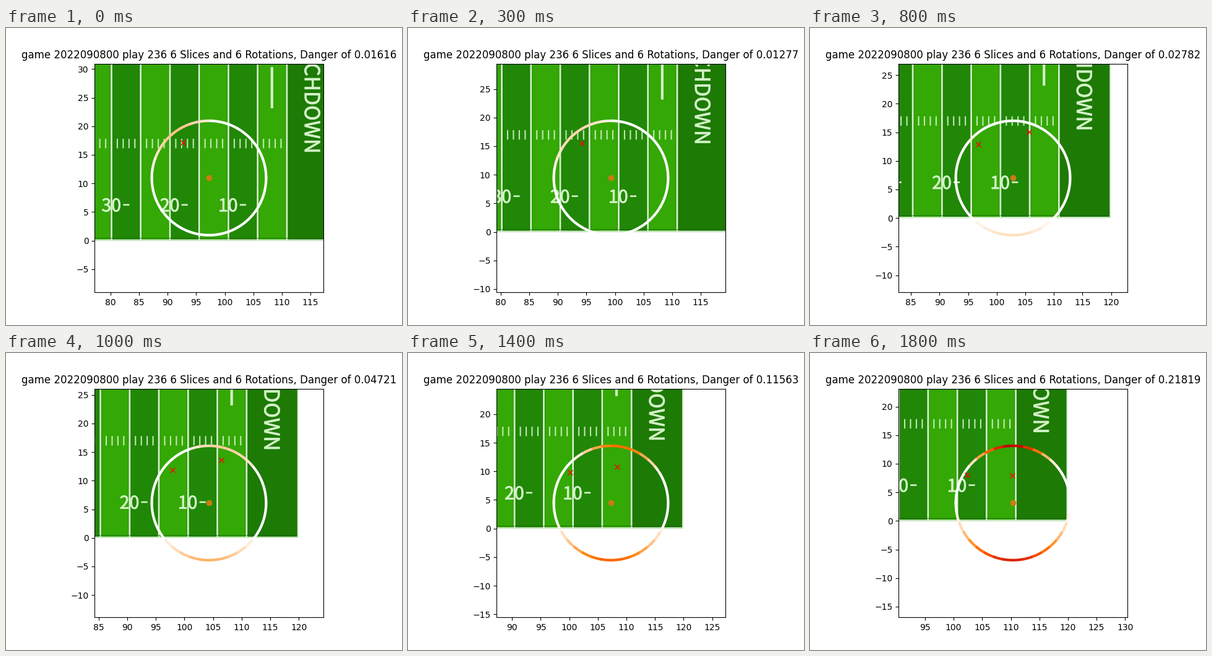
Animation of 640 by 480 pixels, one loop 1.9 s. Source, as a matplotlib script:

```python
import numpy as np
import matplotlib.pyplot as plt
from matplotlib.animation import FuncAnimation
from matplotlib.collections import LineCollection
from matplotlib.patches import Rectangle
from matplotlib.patheffects import withStroke
from matplotlib.ticker import MultipleLocator

FRAMES, INTERVAL = 19, 100
REACH, VIEW = 10, 20          # yards: circle radius, half the window
LIGHT, DARK, END_ZONE = "#34a805", "#218707", "#1d7a05"
PAINT, EDGE = "#d2f2c6", "#d8f0d2"
STRIPE, GOAL, FIELD_END = 5.113, 110.87, 119.85

# Displayed danger at a few steps, growing exponentially in between
DANGER = {0: 0.01616, 3: 0.01277, 5: 0.01375, 6: 0.0166,
          8: 0.02782, 10: 0.04721, 14: 0.11563, 18: 0.21819}

fig, ax = plt.subplots(figsize=(6.4, 4.8), dpi=100)
ax.set_aspect("equal", adjustable="box")
ax.set_autoscale_on(False)
for axis in (ax.xaxis, ax.yaxis):
    axis.set_major_locator(MultipleLocator(5))


def stroke(xs, ys, width, color=PAINT, alpha=1):
    ax.plot(xs, ys, color=color, lw=width, alpha=alpha, zorder=1.5,
            solid_capstyle="butt", snap=False, scalex=False, scaley=False)


def block(x, width, color):
    ax.add_patch(Rectangle((x, 0), width, 53, fc=color, lw=0, snap=False))


def paint_text(x, y, text, size, rotation=0):
    ax.text(x, y, text, size=size, rotation=rotation, rotation_mode="anchor",
            ha="right", va="baseline", color=PAINT, zorder=2, clip_on=True,
            family="Noto Sans CJK JP",
            path_effects=[withStroke(linewidth=0.6, foreground=PAINT)])


def draw_field():
    block(GOAL, FIELD_END - GOAL, END_ZONE)
    for i in range(1, 9):
        x = GOAL - i * STRIPE
        block(x, STRIPE, LIGHT if i % 2 else DARK)
        for k in range(1, 5):
            mark = x + k * STRIPE / 5
            stroke([mark, mark], [16.15, 17.8], 1.5, alpha=0.9)
    for i in range(9):
        x = GOAL - i * STRIPE
        stroke([x, x], [0, 53], 3.6, "#1c7206", 0.45)
        stroke([x, x], [0, 53], 2)

    stroke([60, FIELD_END], [0.42, 0.42], 1, "#135a04", 0.5)
    stroke([60, FIELD_END], [0.1, 0.1], 1.4, EDGE)
    stroke([FIELD_END] * 2, [0, 53], 1.4, EDGE)
    stroke([108.26] * 2, [23.15, 30.35], 3)

    for i in range(3):
        x = 102.28 - 10.2 * i
        paint_text(x, 5.1, f"{10 * (i + 1)}", 20.5)
        stroke([x + 0.35, x + 1.45], [6.25, 6.25], 1.9)
    paint_text(114.0, 15.25, "TOUCHDOWN", 24, rotation=270)


def poly(t, *coeffs):
    return sum(c * t ** n for n, c in enumerate(coeffs))


def ball_at(t):
    return np.array([poly(t, 97.24, 0.674, 0.0031),
                     poly(t, 10.95, -0.508, 0, 0.000227)])


def men_at(t):
    """Defenders relative to the ball."""
    left = poly(t, -4.55, -0.175, -0.001), poly(t, 6.2, -0.035, 0, -0.000115)
    right = poly(t, 5.1, -0.29), poly(t, 9.5, -0.115, -0.0082)
    return np.array([left, right])


def lobe(angles, center, height, half):
    off = np.abs((angles - center + 180) % 360 - 180) / half
    return np.where(off < 1, max(height, 0) * np.cos(off * np.pi / 2) ** 2, 0)


def heat_around(angles, ball, men):
    """Close defenders and a close sideline heat up their side of the ring."""
    heat = lobe(angles, 270, 0.095 * (7.7 - ball[1]), 111 - 7 * ball[1])
    for x, y in men:
        bearing = np.degrees(np.arctan2(y, x))
        heat = heat + lobe(angles, bearing, 0.13 * (8.6 - np.hypot(x, y)), 57)
    return np.where(heat < 0.025, 0, heat)


draw_field()
STARTS = np.arange(0, 360, 10)
ARCS = np.radians(STARTS[:, None] + np.linspace(-0.4, 10.4, 7))
RING = REACH * np.stack([np.cos(ARCS), np.sin(ARCS)], axis=-1)
HEAT = plt.get_cmap("gist_heat_r")

ring = LineCollection(RING, linewidths=3, zorder=3)
ax.add_collection(ring, autolim=False)
dot, = ax.plot([], [], "o", color="#c87d12", ms=6, zorder=4)
crosses, = ax.plot([], [], "x", color="red", ms=6, zorder=4)


def draw(step):
    ball, men = ball_at(step), men_at(step)
    ax.set_xlim(ball[0] - VIEW, ball[0] + VIEW)
    ax.set_ylim(ball[1] - VIEW, ball[1] + VIEW)
    dot.set_data(ball[:, None])

    near = men[np.hypot(*men.T) < REACH]
    crosses.set_data((near + ball).T)
    ring.set_segments(RING + ball)
    ring.set_color(HEAT(heat_around(STARTS + 5, ball, men)))

    logs = np.log(list(DANGER.values()))
    danger = float(np.exp(np.interp(step, list(DANGER), logs)))
    ax.set_title("game 2022090800 play 236 6 Slices and 6 Rotations, "
                 f"Danger of {round(danger, 5)}")
    return ring, dot, crosses


anim = FuncAnimation(fig, draw, frames=FRAMES, interval=INTERVAL, repeat=True)
plt.show()
```
